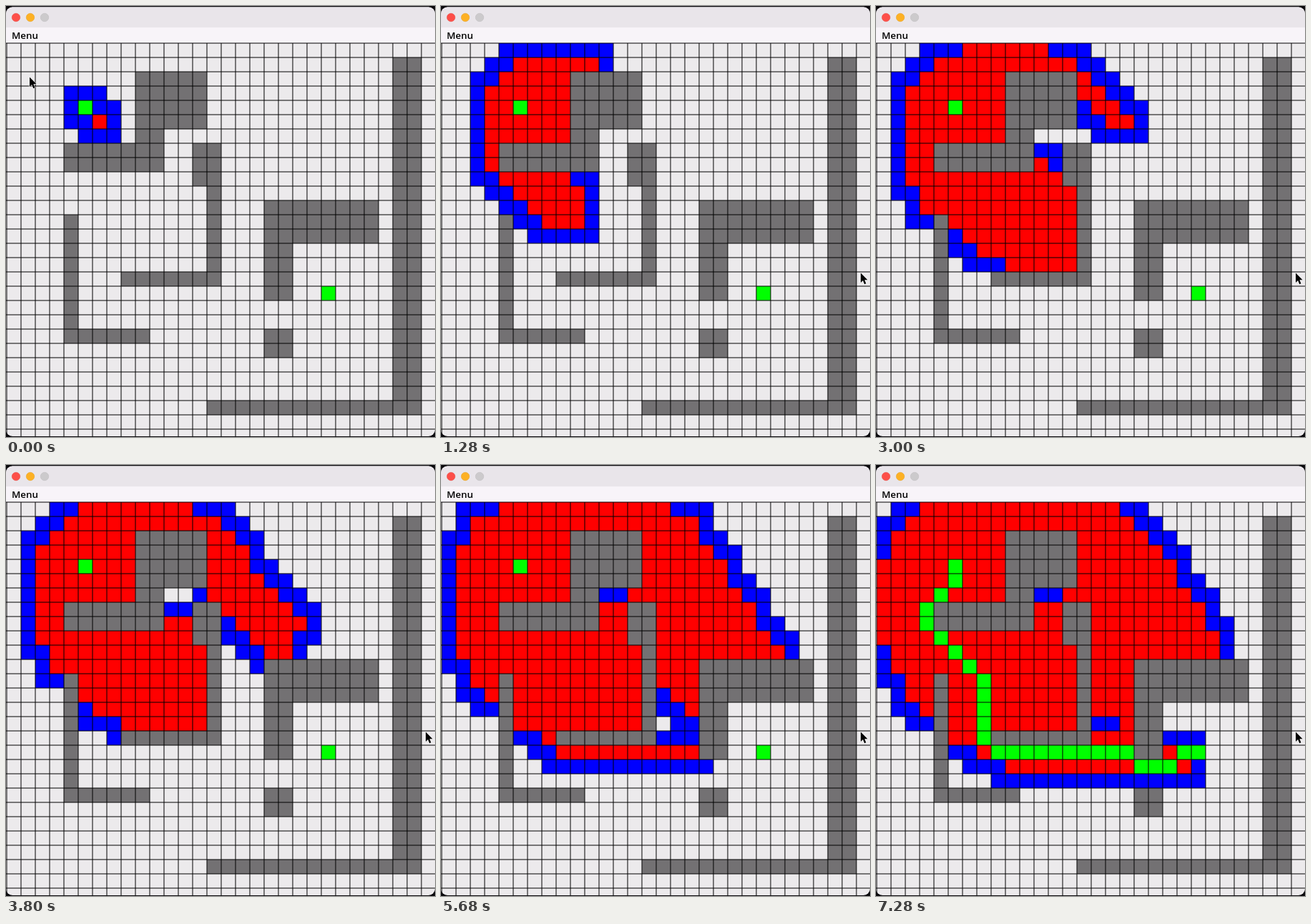
An HTML page that plays this animation: 600 by 603 pixels, repeating every 7320 ms.

```html
<!DOCTYPE html>
<html lang="en">
<head>
<meta charset="utf-8">
<title>Path search</title>
<style>
  html, body { margin: 0; width: 100%; height: 100%; overflow: hidden; background: #0b0a0d; }
  svg { display: block; width: 600px; height: 603px; }
  text { font: 600 13.4px "Open Sans", "Noto Sans", sans-serif; }
</style>
</head>
<body>
<svg viewBox="0 0 600 603">
  <clipPath id="window"><rect y="1.5" width="600" height="600.5" rx="9"/></clipPath>
  <g clip-path="url(#window)">
    <rect width="600" height="603" fill="#eceaec"/>
    <rect width="600" height="30" fill="#e9e5ea"/>
    <rect y="30" width="600" height="22" fill="#f8f4f9"/>
    <g stroke-width=".5">
      <circle cx="14" cy="16" r="5.75" fill="#fd4f49" stroke="#e2453f"/>
      <circle cx="34" cy="16" r="5.75" fill="#fdb124" stroke="#e09c22"/>
      <circle cx="54" cy="16" r="5.75" fill="#cccacc" stroke="#bab8ba"/>
    </g>
    <text x="8" y="46">Menu</text>
    <g transform="translate(1 52)">
      <g id="cells" shape-rendering="crispEdges"></g>
      <path id="lines" fill="none" stroke="#000"/>
    </g>
  </g>
  <path id="cursor" d="M0 0V13.5L3.1 10.6L5.3 15.7L7.5 14.7L5.4 9.8H9.6Z" fill="#000" stroke="#fff" paint-order="stroke"/>
</svg>
<script>
const LOOP = 7320, FRAME = 40, STEPS_PER_FRAME = 1.62;
const COLS = 30, ROWS = 28, SIZE = 20;
const COLOR = { wall: '#737173', open: '#0000ff', closed: '#ff0000', path: '#00ff00' };

// Walls as [column, row, width, height].
const walls = [
  [9, 2, 5, 4], [9, 6, 2, 1], [4, 7, 7, 2], [13, 7, 2, 3], [14, 10, 1, 6], [8, 16, 7, 1],
  [4, 12, 1, 9], [5, 20, 5, 1], [18, 11, 8, 3], [18, 14, 2, 4], [18, 20, 2, 2],
  [27, 1, 2, 25], [14, 25, 13, 1]
];

const cellLayer = document.getElementById('cells');
const cursor = document.getElementById('cursor');

function addRect(col, row, w, h, fill) {
  const rect = document.createElementNS('http://www.w3.org/2000/svg', 'rect');
  const attrs = { x: col * SIZE, y: row * SIZE, width: w * SIZE, height: h * SIZE, fill };
  for (const name in attrs) rect.setAttribute(name, attrs[name]);
  return cellLayer.appendChild(rect);
}

const isWall = (x, y) =>
  walls.some(([c, r, w, h]) => x >= c && x < c + w && y >= r && y < r + h);

const grid = Array.from({ length: COLS * ROWS }, (_, i) => {
  const x = i % COLS, y = Math.floor(i / COLS);
  return { x, y, wall: isWall(x, y), g: Infinity, opened: Infinity, closed: Infinity };
});
const cellAt = (x, y) =>
  x >= 0 && x < COLS && y >= 0 && y < ROWS ? grid[y * COLS + x] : null;

// A* with straight-line distance; records the step at which each cell opens and closes.
function search(start, goal) {
  const EPS = 1e-9;
  const score = c => c.g + Math.hypot(goal.x - c.x, goal.y - c.y);
  const open = [start];
  start.g = 0;
  start.opened = 0;
  for (let step = 0; open.length; step++) {
    let best = 0;
    open.forEach((c, i) => { if (score(c) < score(open[best]) - EPS) best = i; });
    const cell = open.splice(best, 1)[0];
    cell.closed = step;
    if (cell === goal) return;
    for (let dy = -1; dy <= 1; dy++) {
      for (let dx = -1; dx <= 1; dx++) {
        const next = cellAt(cell.x + dx, cell.y + dy);
        if (!next || next.wall || next.closed <= step) continue;
        const g = cell.g + Math.hypot(dx, dy);
        if (g >= next.g - EPS) continue;
        if (next.opened === Infinity) {
          next.opened = step;
          open.push(next);
        }
        next.g = g;
        next.parent = cell;
      }
    }
  }
}

const start = cellAt(5, 4), goal = cellAt(22, 17);
search(start, goal);
for (let c = goal; c; c = c.parent) c.onPath = true;

walls.forEach(w => addRect(...w, COLOR.wall));
const visited = grid.filter(c => c.opened < Infinity);
visited.forEach(c => { c.rect = addRect(c.x, c.y, 1, 1, 'none'); });

let lines = '';
for (let c = 0; c < COLS; c++) lines += `M${c * SIZE} 0V${ROWS * SIZE}`;
for (let r = 0; r < ROWS; r++) lines += `M-1 ${r * SIZE}H${COLS * SIZE}`;
document.getElementById('lines').setAttribute('d', lines);

function cellColor(cell, step) {
  if (cell === start || cell === goal) return COLOR.path;
  if (cell.onPath && step >= goal.closed) return COLOR.path;
  if (cell.closed <= step) return COLOR.closed;
  return cell.opened <= step ? COLOR.open : 'none';
}

function render(time) {
  const frame = Math.floor((time % LOOP) / FRAME);
  const step = 1 + Math.floor(frame * STEPS_PER_FRAME + .98);
  for (const cell of visited) {
    const fill = cellColor(cell, step);
    if (fill !== cell.fill) cell.rect.setAttribute('fill', cell.fill = fill);
  }
  const p = Math.min(1, Math.max(0, (frame * FRAME - 80) / 560));
  const ease = p * p * (3 - 2 * p);
  cursor.setAttribute('transform', `translate(${33 + 554 * ease} ${99.5 + 274 * ease})`);
}

const origin = performance.now();
function tick() {
  render(performance.now() - origin);
  requestAnimationFrame(tick);
}
tick();
</script>
</body>
</html>
```
